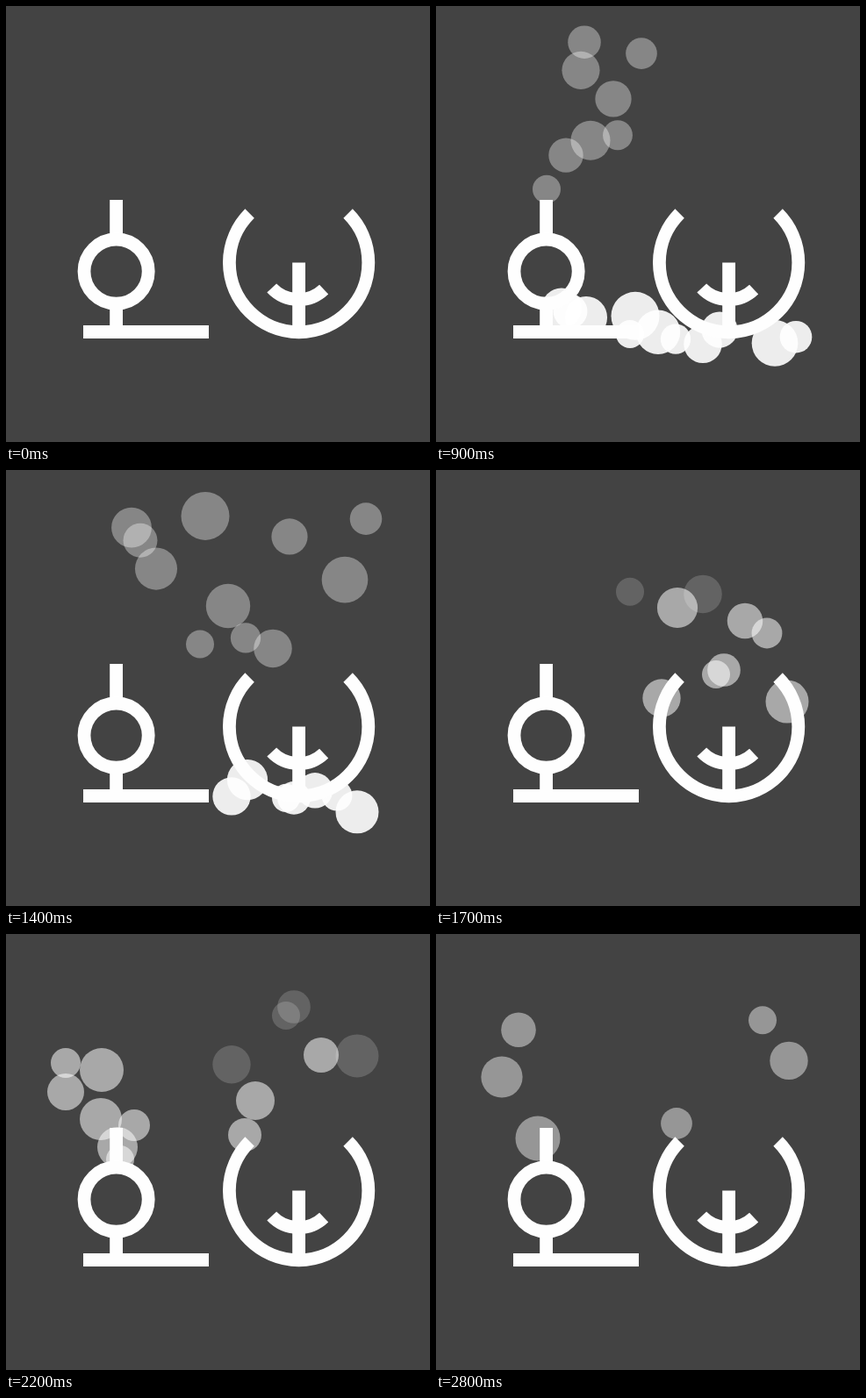
An HTML page with a canvas for the animation above (2900 ms loop, 483 px wide and 497 px high).

```html
<!DOCTYPE html>
<html lang="en">
<head>
<meta charset="utf-8">
<title>Bubbles</title>
<style>
  html, body { margin: 0; width: 100%; height: 100%; overflow: hidden; background: #434343; }
  canvas { display: block; }
</style>
</head>
<body>
<canvas id="stage" width="483" height="497"></canvas>
<script>
const ctx = document.getElementById('stage').getContext('2d');
const LOOP = 2900, STEP = 100;
const BACK = '#434343', INK = '#fefefe';
const FIRST = 300, GAP = 500, MIDWAY = 400, SMALLEST = 16;

// One key point per bubble, where it floats midway; largest bubble first.
// Bubbles that rise less than `slow` live longer.
const bursts = [
  { largest: 22.5, points: [[176, 224], [165, 166], [202, 191], [148, 235],
    [169, 143], [234, 155], [207, 221], [126, 262]] },
  { largest: 27.5, points: [[227, 151], [386, 210], [253, 226], [171, 192], [143, 157],
    [304, 263], [323, 172], [153, 168], [410, 161], [273, 253], [221, 256]] },
  { largest: 24.5, slow: 400, points: [[400, 264], [275, 157], [257, 260], [352, 172],
    [328, 228], [377, 186], [319, 233]] },
  { largest: 25, points: [[109, 155], [108, 211], [127, 243], [284, 190], [68, 180],
    [359, 138], [272, 229], [146, 218], [68, 147], [130, 257]] },
  { largest: 25.5, points: [[116, 255], [75, 196], [402, 189], [94, 152], [274, 245], [372, 150]] }
];

// Share of the rise covered at a given age
function ease(age) {
  const p = Math.max(0.008, (age - 37) / 1942);
  return 1 - (1 - p) ** 3;
}

// Bubbles start on a slightly tilted floor that lifts with every burst
const floorAt = (x, i) => 380 - 9 * i + 0.15 * x;

function drawBurst({ largest, slow = 340, points }, i, time) {
  const age = time - FIRST - GAP * i;
  if (age < 0) return;
  const done = ease(age);
  ctx.fillStyle = `rgba(255, 255, 255, ${1 - done})`;
  points.forEach(([x, y], n) => {
    const floor = floorAt(x, i);
    const rise = (floor - y) / ease(MIDWAY);
    if (age >= (rise < slow ? 1000 : 900)) return;
    const r = largest + (SMALLEST - largest) * n / (points.length - 1);
    ctx.beginPath();
    ctx.arc(x, floor - rise * done, r, 0, Math.PI * 2);
    ctx.fill();
  });
}

function line(x1, y1, x2, y2) {
  ctx.beginPath();
  ctx.moveTo(x1, y1);
  ctx.lineTo(x2, y2);
  ctx.stroke();
}

function arc(x, y, r, from, to) {
  ctx.beginPath();
  ctx.arc(x, y, r, from * Math.PI / 180, to * Math.PI / 180);
  ctx.stroke();
}

function drawSigns() {
  ctx.strokeStyle = INK;
  ctx.lineWidth = 14.8;
  line(125.6, 221, 125.6, 264);
  arc(125.6, 302.6, 36.6, 0, 360);
  line(125.6, 341, 125.6, 368);
  line(88, 371.5, 231, 371.5);
  arc(333.6, 292.6, 79.2, -45, 225);
  arc(333.2, 292.6, 42, 46.5, 136.5);
  line(333.6, 292.5, 333.6, 370);
}

function draw(time) {
  ctx.fillStyle = BACK;
  ctx.fillRect(0, 0, 483, 497);
  bursts.forEach((burst, i) => drawBurst(burst, i, time));
  drawSigns();
}

const origin = performance.now();
function tick() {
  const t = (performance.now() - origin) % LOOP;
  draw(Math.floor(t / STEP) * STEP);
  requestAnimationFrame(tick);
}
tick();
</script>
</body>
</html>
```
